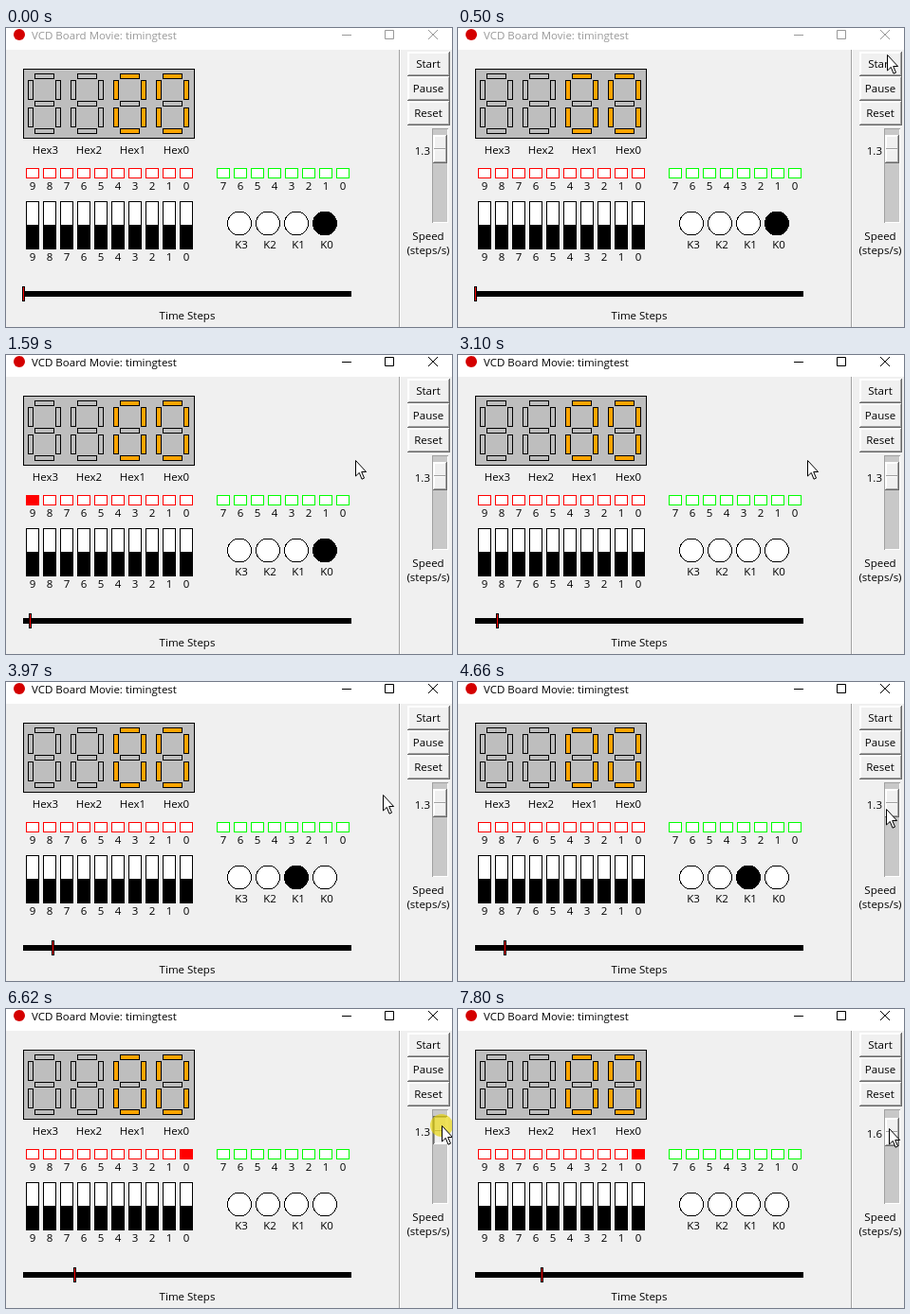
Animation of 470 by 316 pixels, one loop 8 s. Source, as an HTML page:

```html
<!DOCTYPE html>
<html lang="en">
<head>
<meta charset="utf-8">
<title>VCD Board Movie</title>
<style>
  html, body { margin: 0; width: 100%; height: 100%; overflow: hidden; background: #f0f0f0; }
  svg { display: block; width: 470px; height: 316px; }
  text { font: 11.5px "Open Sans", "Noto Sans", sans-serif; }
  rect, .crisp { shape-rendering: crispEdges; }
</style>
</head>
<body>
<svg id="stage" viewBox="0 0 470 316" width="470" height="316"></svg>
<script>
const LOOP = 8000;
const stage = document.getElementById('stage');

function set(el, attrs) {
  for (const key in attrs) el.setAttribute(key, attrs[key]);
}
function add(name, attrs, parent = stage) {
  const el = document.createElementNS('http://www.w3.org/2000/svg', name);
  set(el, attrs);
  parent.append(el);
  return el;
}
function box(x, y, width, height, fill, parent) {
  return add('rect', { x, y, width, height, fill }, parent);
}
// A rectangle with a one-pixel outline inside the given size.
function outlined(x, y, w, h, fill, stroke = '#000') {
  const el = box(x + .5, y + .5, w - 1, h - 1, fill);
  set(el, { stroke });
  return el;
}
function label(str, x, y, anchor = 'middle', parent) {
  const el = add('text', { x, y, 'text-anchor': anchor }, parent);
  el.textContent = str;
  return el;
}
// One-pixel raised edge: light at top left, dark at bottom right.
function raised(x, y, w, h, dark, parent) {
  box(x, y, w, h, dark, parent);
  box(x, y, w - 1, h - 1, '#fff', parent);
  box(x + 1, y + 1, w - 2, h - 2, '#f0f0f0', parent);
}

// Title bar
box(0, 0, 470, 316, '#f0f0f0');
box(0, 0, 470, 23, '#fff');
add('circle', { cx: 14, cy: 7, r: 6, fill: '#d40000' });
const title = label('VCD Board Movie: timingtest', 27, 11.5, 'start');
const controls = add('path', {
  d: 'M354 7.5h10M399.5 2.5h9v9h-9zM445 2l10 10M455 2l-10 10', fill: 'none'
});

// Seven-segment displays, each showing nothing or a zero
outlined(18, 43, 181, 74, '#bebebe');
for (let digit = 0; digit < 4; digit++) {
  const x = 23 + digit * 45;
  const lit = digit > 1 ? '#ffa500' : '#bebebe';
  for (let row = 0; row < 3; row++) {
    outlined(x + 7, 48 + row * 29, 21, 6, row === 1 ? '#bebebe' : lit);
  }
  for (let row = 0; row < 2; row++) {
    for (const side of [0, 29]) outlined(x + side, 55 + row * 29, 6, 21, lit);
  }
  label('Hex' + (3 - digit), 41.5 + digit * 46, 133);
}

// LEDs and switches
function led(x, n, color) {
  label(n, x + 7, 171);
  return outlined(x, 148, 14, 11, '#fff', color);
}
const redLeds = [];
for (let n = 9; n >= 0; n--) {
  const x = 21 + (9 - n) * 18;
  redLeds[n] = led(x, n, '#f00');
  outlined(x, 183, 14, 51, '#fff');
  box(x, 208, 14, 26, '#000');
  label(n, x + 7, 246);
}
for (let n = 7; n >= 0; n--) led(222 + (7 - n) * 18, n, '#0f0');

// Keys
const keys = [];
for (let n = 3; n >= 0; n--) {
  const cx = 246 + (3 - n) * 30;
  keys[n] = add('circle', { cx, cy: 206.5, r: 12.5, stroke: '#000', class: 'crisp' });
  label('K' + n, cx + 2, 233);
}

// Timeline
box(18, 278, 346, 6, '#000');
const marker = outlined(0, 273, 3, 16, '#f00');
label('Time Steps', 191, 308);

// Side panel
box(414, 23, 1, 293, '#a0a0a0');
box(415, 23, 1, 293, '#fff');
['Start', 'Pause', 'Reset'].forEach((name, i) => {
  const y = 25 + i * 26;
  raised(423, y, 45, 26, '#696969');
  raised(424, y + 1, 43, 24, '#a0a0a0');
  label(name, 445, y + 17);
});
const pressed = add('path', {
  d: 'M423.5 51V25.5H468', fill: 'none', stroke: '#696969', class: 'crisp'
});
box(449, 106, 17, 100, '#a0a0a0');
box(450, 107, 16, 99, '#fff');
box(450, 107, 15, 98, '#c8c8c8');
const slider = add('g', {});
const handle = add('g', {}, slider);
raised(450, 113, 15, 30, '#696969', handle);
for (const y of [114, 128]) raised(451, y, 13, 14, '#a0a0a0', handle);
const speed = label('', 447, 134, 'end', slider);
label('Speed', 445, 224);
label('(steps/s)', 445, 239);

// Pointer
const pointer = add('g', {});
const halo = add('circle', { r: 12, fill: '#e6d200', opacity: .65 }, pointer);
add('path', {
  d: 'M.5 .5V17L4.3 13.4L7 20.2L9.5 19.1L6.7 12.5H11.6Z',
  fill: '#fff', stroke: '#000', 'stroke-linejoin': 'round'
}, pointer);

const ENTRY = { x: 406, y: 275 };
const MOVES = [
  { from: 30, to: 500, x: 452, y: 28 },
  { from: 500, to: 800, x: 452, y: 35 },
  { from: 1230, to: 1430, x: 368, y: 111 },
  { from: 3840, to: 4660, x: 451, y: 134 },
  { from: 4660, to: 4870, x: 459, y: 123 },
  { from: 6640, to: 7200, x: 454, y: 126 }
];
const clamp = (v, lo, hi) => Math.min(hi, Math.max(lo, v));
const within = (t, from, to) => t >= from && t < to;
const show = (el, on) => set(el, { visibility: on ? 'visible' : 'hidden' });
const easeOut = k => 1 - (1 - k) ** 2.5;

function pointerAt(t) {
  let { x, y } = ENTRY;
  for (const move of MOVES) {
    const k = easeOut(clamp((t - move.from) / (move.to - move.from), 0, 1));
    x += (move.x - x) * k;
    y += (move.y - y) * k;
  }
  return `translate(${Math.round(x)} ${Math.round(y)})`;
}

// Steps run every 750 ms, with a short hold while the pointer nears the slider.
function stepAt(t) {
  const hold = clamp(t - 4300, 0, 160);
  return Math.max(0, 1 + Math.floor((t - 1590 - hold) / 750));
}

function draw(t) {
  const step = stepAt(t);
  const ink = t < 650 ? '#999' : '#000';
  set(title, { fill: ink });
  set(controls, { stroke: ink });

  set(marker, { x: Math.floor(17 + 7.85 * step) + .5 });
  set(redLeds[9], { fill: step === 1 || step % 3 === 2 ? '#f00' : '#fff' });
  set(redLeds[0], { fill: step >= 7 ? '#f00' : '#fff' });
  set(keys[0], { fill: step < 2 ? '#000' : '#fff' });
  set(keys[1], { fill: within(step, 4, 7) ? '#000' : '#fff' });
  for (const key of keys.slice(2)) set(key, { fill: '#fff' });

  const notches = clamp(1 + Math.floor((t - 6640) / 235), 0, 3);
  speed.textContent = (1.3 + notches / 10).toFixed(1);
  set(slider, { transform: `translate(0 ${Math.round(notches * .7)})` });

  const clicking = within(t, 650, 790);
  const dragging = within(t, 6250, 7560);
  set(handle, { transform: dragging ? 'rotate(180 457.5 128)' : '' });
  show(pressed, clicking);
  show(halo, clicking || dragging);
  show(pointer, t >= 30);
  set(pointer, { transform: pointerAt(t) });
}

const start = performance.now();
function tick() {
  draw((performance.now() - start) % LOOP);
  requestAnimationFrame(tick);
}
draw(0);
requestAnimationFrame(tick);
</script>
</body>
</html>
```
